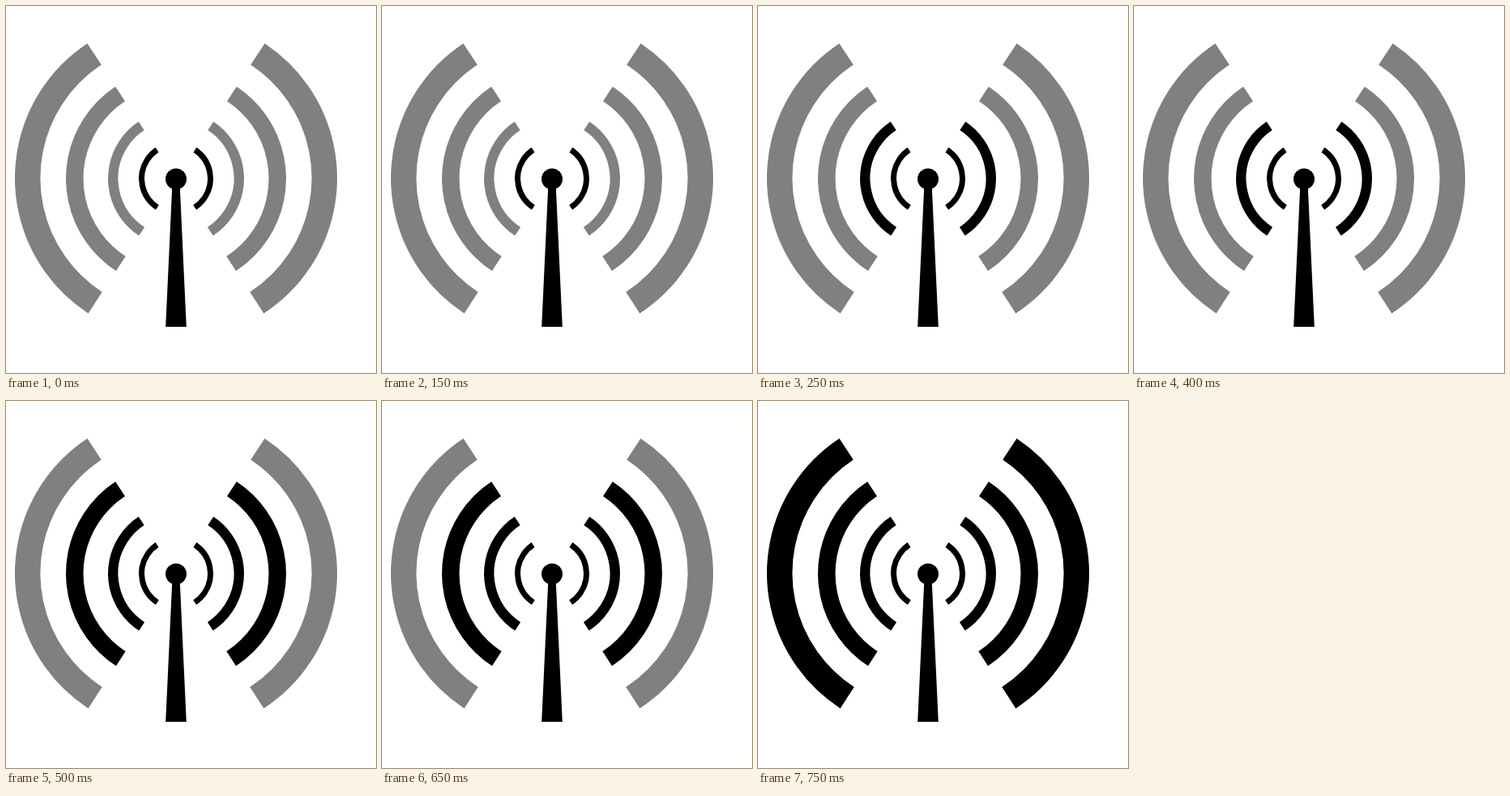
Animation of 457x453 px, one loop 1 s. Source, as an HTML page with a canvas:

```html
<!DOCTYPE html>
<html lang="en">
<head>
<meta charset="utf-8">
<title>Antenna signal</title>
<style>
html, body { margin: 0; width: 100%; height: 100%; overflow: hidden; background: #fff; }
canvas { display: block; }
</style>
</head>
<body>
<canvas id="stage" width="457" height="453"></canvas>
<script>
const ctx = document.getElementById('stage').getContext('2d');
const STEP = 250;
const CX = 210;
const TOP = 56.6 * Math.PI / 180;
const BOTTOM = 57 * Math.PI / 180;
const waves = [
  { y: 213, inner: 39, outer: 46 },
  { y: 213, inner: 71.5, outer: 84 },
  { y: 213, inner: 114.5, outer: 136 },
  { y: 212.5, inner: 167.6, outer: 199 }
];

function drawWave({ y, inner, outer }, color) {
  ctx.strokeStyle = color;
  ctx.lineWidth = outer - inner;
  const r = (inner + outer) / 2;
  ctx.beginPath();
  ctx.arc(CX, y, r, -TOP, BOTTOM);
  ctx.stroke();
  ctx.beginPath();
  ctx.arc(CX, y, r, Math.PI - BOTTOM, Math.PI + TOP);
  ctx.stroke();
}

function drawMast() {
  ctx.fillStyle = '#000';
  ctx.beginPath();
  ctx.arc(CX, 213.5, 13, 0, Math.PI * 2);
  ctx.fill();
  ctx.beginPath();
  ctx.moveTo(205.3, 222);
  ctx.lineTo(214.7, 222);
  ctx.lineTo(222.8, 396);
  ctx.lineTo(197.2, 396);
  ctx.fill();
}

function draw(time) {
  const level = Math.floor(time / STEP) % waves.length;
  ctx.fillStyle = '#fff';
  ctx.fillRect(0, 0, 457, 453);
  waves.forEach((wave, i) => drawWave(wave, i <= level ? '#000' : '#808080'));
  drawMast();
}

const start = performance.now();
function tick() {
  draw(performance.now() - start);
  requestAnimationFrame(tick);
}
tick();
</script>
</body>
</html>
```
